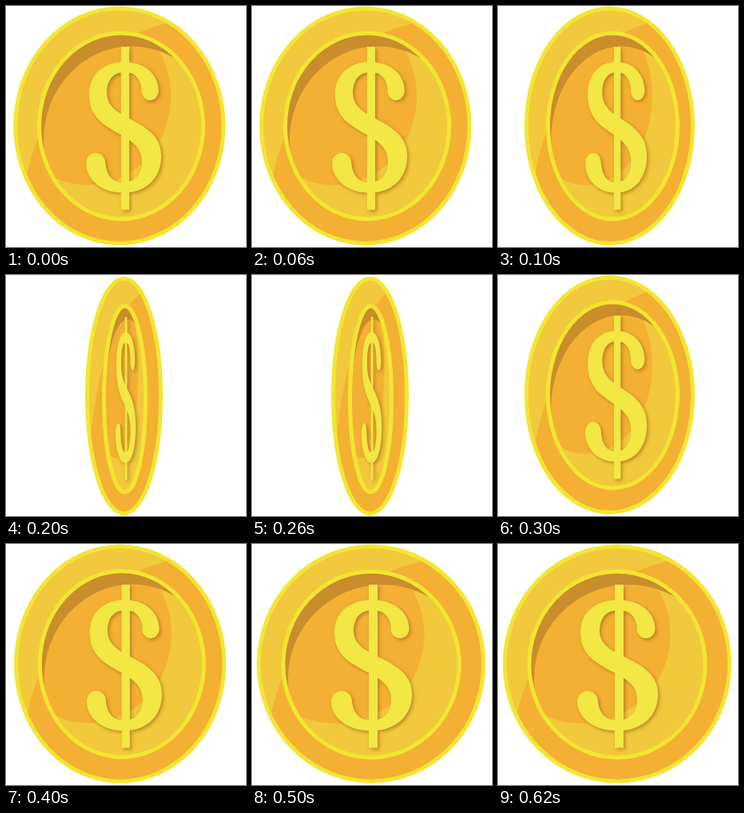
Animation of 300 by 302 pixels, one loop 0.7 s. Source, as an HTML page with a canvas:

```html
<!DOCTYPE html>
<html lang="en">
<head>
<meta charset="utf-8">
<title>Spinning coin</title>
<style>
html, body { margin: 0; width: 100%; height: 100%; overflow: hidden; background: #fff; }
canvas { display: block; }
</style>
</head>
<body>
<canvas id="stage" width="300" height="302"></canvas>
<script>
const ctx = document.getElementById('stage').getContext('2d');
const YELLOW = '#f2e632', LIGHT = '#f2c83c', ORANGE = '#f3b033', SHADE = '#c98d2c';
const LINE = 5, MID = 149;

// Each layer: [centre x, horizontal scale, vertical shift]
const pose = (rim, face, sign) => ({ rim, face, sign });
const wide = dx => pose([141.8 + dx, .927, 0], [144 + dx, .933, -.5], [146.6 + dx, .93, 0]);
const half = pose([139.5, .745, 0], [143.5, .742, -.5], [147.2, .762, 0]);
const edge = pose([147.5, .339, 1.5], [148.5, .253, 4.5], [149.4, .25, 1.5]);
const full = pose([149, 1, 0], [149, 1, 0], [149, 1, 0]);
const poses = [wide(0), half, edge, half, wide(.8), full];

// Turns a path drawn for the full-on coin by squeezing it sideways
function turn(path, [x, scale, dy]) {
  const out = new Path2D();
  out.addPath(path, new DOMMatrix([scale, 0, 0, 1, x - MID * scale, dy]));
  return out;
}

function ellipse(x, y, rx, ry = rx) {
  const p = new Path2D();
  p.ellipse(x, y, rx, ry, 0, 0, 7);
  return p;
}

const sweep = ellipse(270, 267, 252);
const blob = ellipse(104, 113.5, 111.5);
const crescent = ellipse(163, 169, 118);
crescent.rect(-50, -50, 400, 400);

const dollar = new Path2D(`M196.5 106C196 84 176 70 150 70C121 70 103 87 103 111
  C103 141 126 151 147 162C166 172 174 181 174 195C174 211 165 221 149 221
  C135 221 127 213 125 198L99 197C99 218 120 234 149 234C180 234 200 216 200 188
  C200 162 178 151 155 140C136 131 127 122 127 109C127 93 135 83 151 83
  C164 83 172 90 174 105Z`);
dollar.moveTo(196.5, 106.5);
dollar.arc(185, 106.5, 11.5, 0, 2 * Math.PI, true);
dollar.moveTo(125, 197);
dollar.arc(112, 197, 13, 0, 2 * Math.PI, true);
dollar.rect(157, 51, -11, 204.5);

function disc(layer, y, rx, ry, base, marks) {
  const [x, scale, dy] = layer;
  const inset = LINE / 2;
  const shape = ellipse(x, y + dy, rx * scale - inset, ry - inset);
  ctx.save();
  ctx.clip(shape);
  ctx.fillStyle = base;
  ctx.fillRect(0, 0, 300, 302);
  for (const [path, color] of marks) {
    ctx.fillStyle = color;
    ctx.fill(turn(path, layer), 'evenodd');
  }
  ctx.restore();
  ctx.strokeStyle = YELLOW;
  ctx.lineWidth = LINE;
  ctx.stroke(shape);
}

function draw(now) {
  const { rim, face, sign } = poses[Math.min(5, Math.floor(now % 700 / 100))];
  ctx.fillStyle = '#fff';
  ctx.fillRect(0, 0, 300, 302);
  disc(rim, 150.2, 143, 149.7, LIGHT, [[sweep, ORANGE]]);
  disc(face, 151, 112.5, 119, LIGHT, [[blob, ORANGE], [crescent, SHADE]]);

  ctx.save();
  ctx.shadowColor = 'rgba(150, 95, 15, .6)';
  ctx.shadowOffsetX = ctx.shadowOffsetY = 2;
  ctx.shadowBlur = 4;
  ctx.fillStyle = '#f2e744';
  ctx.fill(turn(dollar, sign));
  ctx.restore();
}

const start = performance.now();
function tick() {
  draw(performance.now() - start);
  requestAnimationFrame(tick);
}
tick();
</script>
</body>
</html>
```
